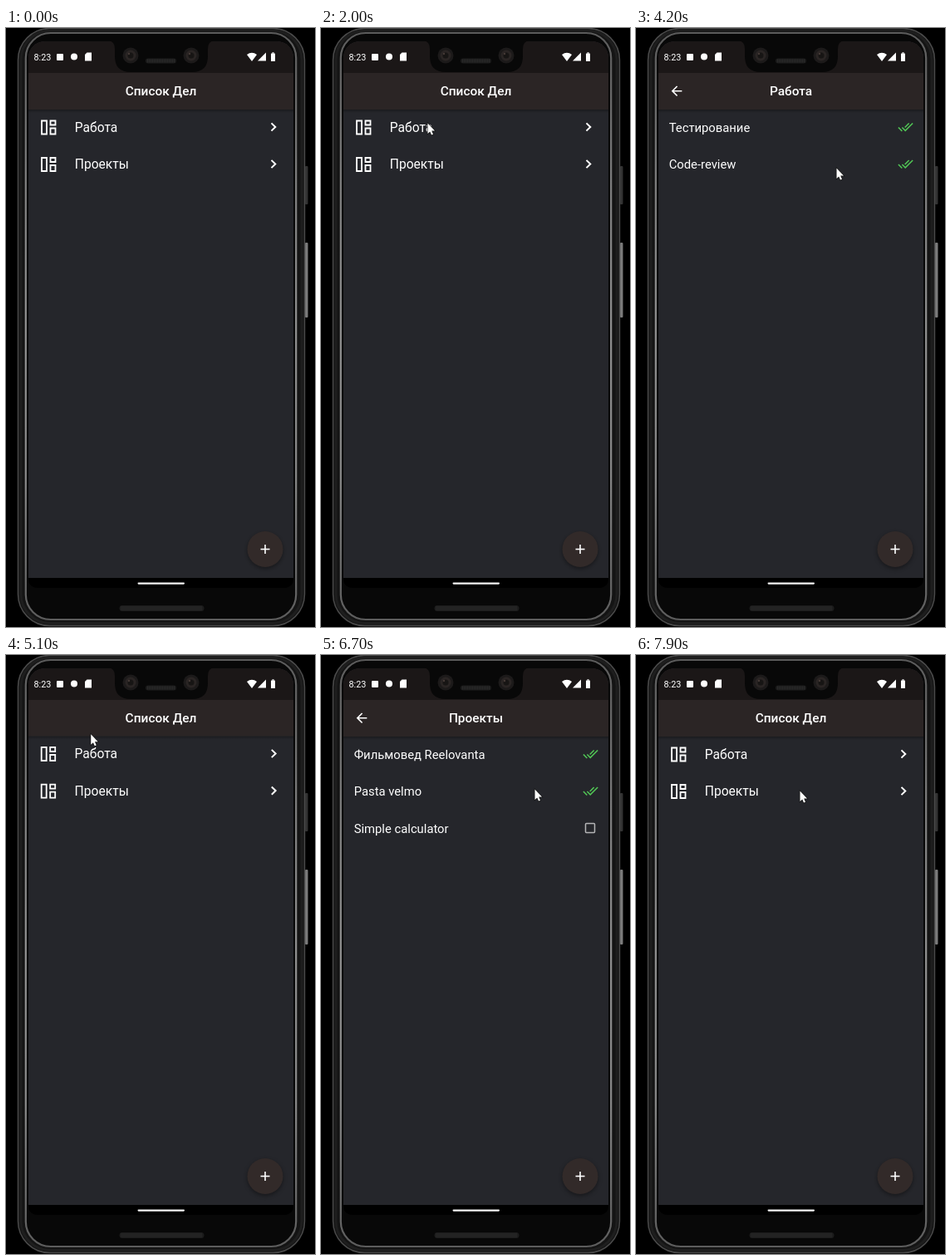
Recreate the animation shown at these times as an HTML page with a canvas. Size 372x720 px, loop 8 s.

```html
<!DOCTYPE html>
<html lang="ru">
<head>
<meta charset="utf-8">
<title>Список дел</title>
<style>
html, body { margin: 0; width: 100%; height: 100%; overflow: hidden; background: #000; }
canvas { display: block; width: 372px; height: 720px; }
</style>
</head>
<body>
<canvas id="stage" width="372" height="720"></canvas>
<script>
const ctx = document.getElementById('stage').getContext('2d');
const LOOP = 8000, STEP = 100;
const FONT = 'Roboto, "Noto Sans", sans-serif';
const BAR = '#2b2525', BACK = '#25262b';
const SCREEN = { x: 27, y: 16, w: 319, h: 645, cx: 186.5, cy: 338 };

const ARROW = new Path2D('M20 11H7.83l5.59-5.59L12 4l-8 8 8 8 1.41-1.41L7.83 13H20v-2z');
const DONE = new Path2D('M18 7l-1.41-1.41-6.34 6.34 1.41 1.41L18 7zm4.24-1.41L11.66 16.17 7.48 12l-1.41 1.41L11.66 19l12-12-1.42-1.41zM.41 13.41L6 19l1.41-1.41L1.83 12 .41 13.41z');
const POINTER = new Path2D('M0.5 0.5V13L3.2 10.4L5 14.6L7 13.7L5.2 9.6H9Z');

const pages = {
  work: {
    title: 'Работа',
    tasks: [['Тестирование', 3700], ['Code-review', 4200]]
  },
  projects: {
    title: 'Проекты',
    tasks: [['Фильмовед Reelovanta', 6300], ['Pasta velmo', 6700], ['Simple calculator', Infinity]]
  }
};

// Visits to a page: opening and closing moments
const visits = [
  { page: pages.work, open: 2600, close: 4950, row: 119 },
  { page: pages.projects, open: 5600, close: 7350, row: 163.5 }
];
const SHIFT = 300;

// Pointer stops: time, x, y
const stops = [
  [400, 17, 301], [700, 169, 363], [800, 169, 363], [1100, 201, 300],
  [1700, 97, 108], [2000, 128, 114], [2800, 128, 114], [3100, 207, 76],
  [3400, 212, 105], [3500, 213, 105], [3600, 213, 105], [4000, 240, 172],
  [4200, 241, 168], [4800, 53, 73], [5000, 53, 73], [5400, 248, 160],
  [5500, 248, 160], [5700, 250, 155], [6100, 257, 112], [6300, 258, 113],
  [6400, 258, 113], [6600, 258, 164], [6700, 257, 161], [7300, 50, 77],
  [7400, 50, 77], [7900, 197, 163]
];

const clamp = v => Math.max(0, Math.min(1, v));
const span = (v, a, b) => clamp((v - a) / (b - a));

function zoomCurve(p) {
  if (p < 1 / 6) return 0.4 * Math.pow(p * 6, 3);
  return 1 - 0.6 * Math.pow(1 - (p - 1 / 6) * 1.2, 5);
}

function box(x, y, w, h, r, fill, stroke, lw = 1) {
  ctx.beginPath();
  ctx.roundRect(x, y, w, h, r);
  if (fill) { ctx.fillStyle = fill; ctx.fill(); }
  if (stroke) { ctx.strokeStyle = stroke; ctx.lineWidth = lw; ctx.stroke(); }
}

function disc(x, y, r, fill) {
  ctx.beginPath();
  ctx.arc(x, y, r, 0, Math.PI * 2);
  ctx.fillStyle = fill;
  ctx.fill();
}

function poly(points, fill, stroke, lw) {
  ctx.beginPath();
  points.forEach(([x, y]) => ctx.lineTo(x, y));
  if (fill) { ctx.fillStyle = fill; ctx.fill(); }
  if (stroke) { ctx.strokeStyle = stroke; ctx.lineWidth = lw; ctx.stroke(); }
}

function text(str, x, y, size, weight = 400, align = 'left') {
  ctx.font = `${weight} ${size}px ${FONT}`;
  ctx.textAlign = align;
  ctx.fillStyle = '#fff';
  ctx.fillText(str, x, y);
}

function icon(path, x, y, color, scale = 0.79) {
  ctx.save();
  ctx.translate(x - 12 * scale, y - 12 * scale);
  ctx.scale(scale, scale);
  ctx.fillStyle = color;
  ctx.fill(path);
  ctx.restore();
}

function fade(y0, y1, ...colors) {
  const g = ctx.createLinearGradient(0, y0, 0, y1);
  colors.forEach((c, i) => g.addColorStop(i / (colors.length - 1), c));
  return g;
}

function sheet(title) {
  ctx.fillStyle = BACK;
  ctx.fillRect(SCREEN.x, SCREEN.y, SCREEN.w, SCREEN.h);
  ctx.fillStyle = fade(98, 102, 'rgba(0,0,0,.3)', 'rgba(0,0,0,0)');
  ctx.fillRect(SCREEN.x, 98, SCREEN.w, 4);
  ctx.fillStyle = BAR;
  ctx.fillRect(SCREEN.x, SCREEN.y, SCREEN.w, 82);
  text(title, SCREEN.cx, 81.3, 15.4, 500, 'center');
}

function home(pressed) {
  sheet('Список Дел');
  if (pressed) {
    ctx.fillStyle = 'rgba(255,255,255,.03)';
    ctx.fillRect(SCREEN.x, pressed - 21, SCREEN.w, 43);
  }
  [['Работа', 119], ['Проекты', 163.5]].forEach(([name, y]) => {
    box(43, y - 7.5, 6, 16, 0, null, '#fff', 1.8);
    box(53.5, y - 7.5, 6, 5, 0, null, '#fff', 1.8);
    box(53.5, y + 1.5, 6, 7, 0, null, '#fff', 1.8);
    text(name, 82.8, y + 5.7, 15.6);
    poly([[319.5, y - 4.6], [324.3, y], [319.5, y + 4.6]], null, '#fff', 2);
  });
}

function taskPage(page, t) {
  sheet(page.title);
  icon(ARROW, 49, 75.7, '#fff');
  page.tasks.forEach(([name, doneAt], i) => {
    const y = 119 + i * 44.5;
    text(name, 39.7, y + 5.5, 14.8);
    if (t >= doneAt) icon(DONE, 324.5, y, '#50c454');
    else box(318.5, y - 5.5, 11, 11, 1, null, '#b4b4b6', 1.5);
  });
}

function zoomed(scale, alpha, draw) {
  ctx.save();
  ctx.globalAlpha = alpha;
  ctx.translate(SCREEN.cx, SCREEN.cy);
  ctx.scale(scale, scale);
  ctx.translate(-SCREEN.cx, -SCREEN.cy);
  ctx.beginPath();
  ctx.rect(SCREEN.x, SCREEN.y, SCREEN.w, SCREEN.h);
  ctx.clip();
  draw();
  ctx.restore();
}

function content(t) {
  const v = visits.find(o => t >= o.open && t < o.close + SHIFT);
  if (!v) return home();
  const show = () => taskPage(v.page, t);
  if (t >= v.close) {
    const p = (t - v.close) / SHIFT, e = zoomCurve(p);
    zoomed(1 + 0.05 * (1 - e), 1, home);
    zoomed(1 - 0.1 * e, 1 - span(p, 0.1, 0.5), show);
    return;
  }
  const p = clamp((t - v.open) / SHIFT), e = zoomCurve(p);
  if (p < 1) {
    zoomed(1 + 0.05 * e, 1, () => home(v.row));
    ctx.fillStyle = `rgba(0,0,0,${0.6 * span(p, 0.2, 0.42)})`;
    ctx.fillRect(SCREEN.x, SCREEN.y, SCREEN.w, SCREEN.h);
  }
  zoomed(0.85 + 0.15 * e, span(p, 0.125, 0.25), show);
}

function body() {
  ctx.fillStyle = '#000';
  ctx.fillRect(0, 0, 372, 720);
  box(360, 166, 3.5, 46, 1, '#333');
  box(360, 258, 3.5, 90, 1, '#7c7c7c');
  box(14.5, 0.5, 345, 718, 38, '#141414', '#4a4a4a', 1.5);
  box(18, 3, 338, 712.5, 35, null, '#1e1e1e', 3);
  box(23.8, 6, 325.4, 705, 30, '#080808',
    fade(0, 720, '#5a5a5a', '#808080', '#939393', '#8a8a8a', '#5a5a5a'), 2.2);
}

function grille(x, y, w, h) {
  box(x, y, w, h, h / 2, '#1c1c1c');
  ctx.fillStyle = '#2b2b2b';
  for (let i = 2; i < w - 2; i += 2) ctx.fillRect(x + i, y + 1, 1, h - 2);
}

function lens(x) {
  disc(x, 33, 9.5, '#1c1a1a');
  disc(x, 33, 6.5, '#2a2524');
  disc(x, 33, 3.5, '#171514');
  disc(x - 2, 31, 1.2, '#453b36');
}

function statusBar() {
  ctx.fillStyle = 'rgba(0,0,0,.38)';
  ctx.fillRect(SCREEN.x, SCREEN.y, SCREEN.w, 38);
  text('8:23', 33.5, 38.7, 10.8);
  box(61, 31, 8, 8, 1, '#fff');
  disc(82, 34.5, 4, '#fff');
  poly([[97.5, 29.5], [103, 29.5], [103, 39.5], [95, 39.5], [95, 32]], '#fff');
  ctx.beginPath();
  ctx.moveTo(296, 40);
  ctx.lineTo(290, 32);
  ctx.quadraticCurveTo(296, 27.5, 302, 32);
  ctx.fillStyle = '#fff';
  ctx.fill();
  poly([[313, 29.5], [313, 39.5], [303, 39.5]], '#fff');
  box(319, 30.5, 5, 9.5, 0.6, '#fff');
  ctx.fillRect(320.4, 29.3, 2.2, 1.4);
}

function notch() {
  ctx.beginPath();
  ctx.moveTo(123, 15);
  ctx.quadraticCurveTo(131, 16, 131, 25);
  ctx.lineTo(131, 34);
  ctx.quadraticCurveTo(131, 53, 150, 53);
  ctx.lineTo(224, 53);
  ctx.quadraticCurveTo(243, 53, 243, 34);
  ctx.lineTo(243, 25);
  ctx.quadraticCurveTo(243, 16, 251, 15);
  ctx.fillStyle = '#080808';
  ctx.fill();
  lens(150);
  lens(223);
  grille(168, 36.5, 37, 6);
}

function addButton() {
  ctx.save();
  ctx.shadowColor = 'rgba(0,0,0,.4)';
  ctx.shadowBlur = 5;
  ctx.shadowOffsetY = 2;
  disc(312, 626.5, 21.5, '#322a29');
  ctx.restore();
  ctx.fillStyle = '#fff';
  ctx.fillRect(306.5, 625.7, 11, 1.6);
  ctx.fillRect(311.2, 621, 1.6, 11);
}

function pointer(t) {
  if (t < stops[0][0]) return;
  let i = stops.findIndex(s => s[0] > t);
  if (i < 0) i = stops.length - 1;
  const [t0, x0, y0] = stops[i - 1], [t1, x1, y1] = stops[i];
  const k = span(t, t0, t1);
  ctx.save();
  ctx.translate(x0 + (x1 - x0) * k, y0 + (y1 - y0) * k);
  ctx.strokeStyle = '#161616';
  ctx.lineWidth = 1.4;
  ctx.stroke(POINTER);
  ctx.fillStyle = '#fff';
  ctx.fill(POINTER);
  ctx.restore();
}

function render(t) {
  body();
  ctx.save();
  ctx.beginPath();
  ctx.roundRect(SCREEN.x, SCREEN.y, SCREEN.w, SCREEN.h, [20, 20, 0, 0]);
  ctx.clip();
  content(t);
  addButton();
  statusBar();
  ctx.restore();
  notch();
  box(27, 661, 319, 12, [0, 0, 10, 10], '#000');
  box(158.5, 666.5, 56.5, 2.2, 1.1, '#f4f4f4');
  grille(136.5, 694, 102, 7);
  pointer(t);
}

function tick(now) {
  render(Math.floor((now % LOOP) / STEP) * STEP);
  requestAnimationFrame(tick);
}
render(0);
requestAnimationFrame(tick);
</script>
</body>
</html>
```
